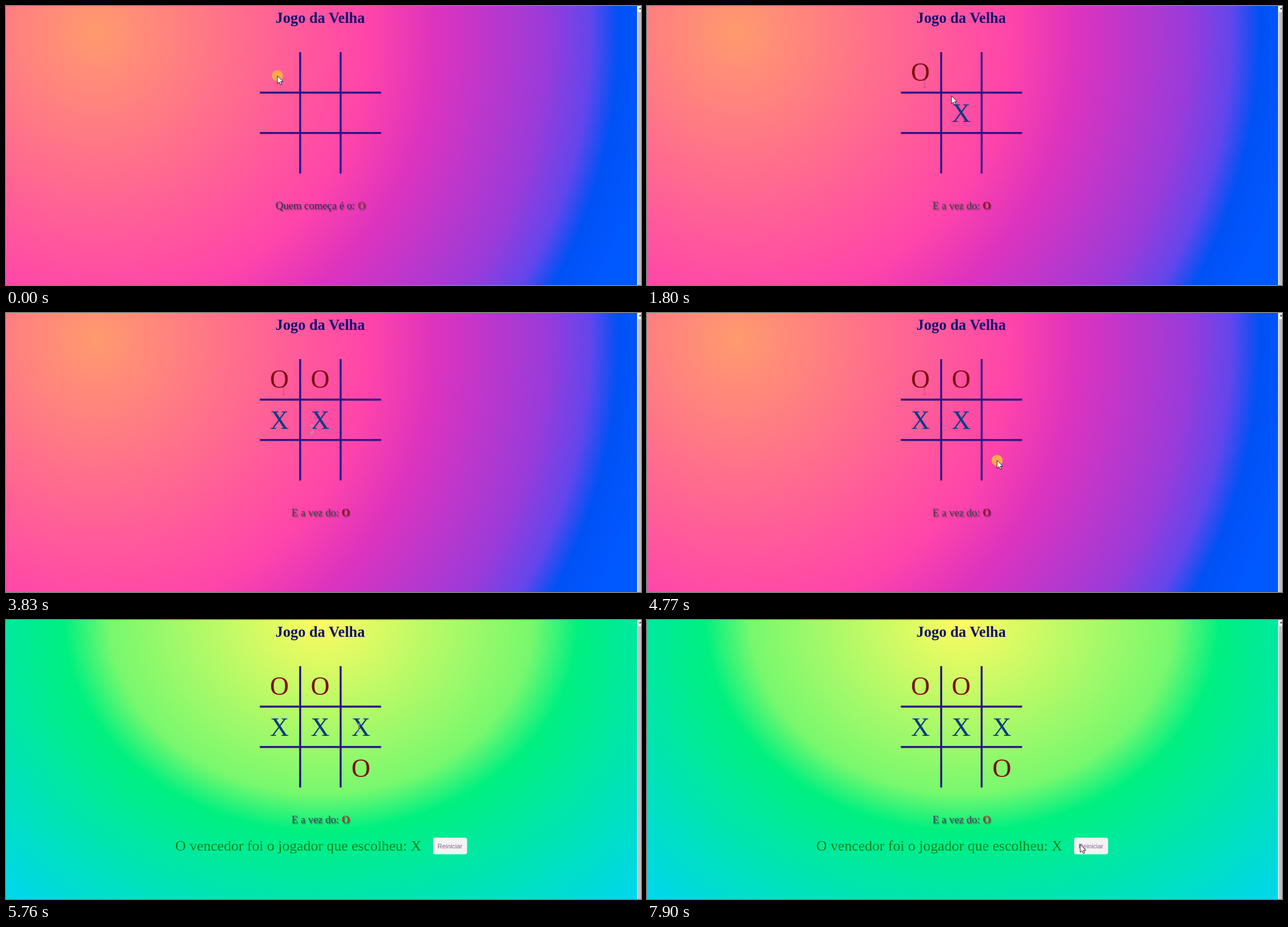
An HTML page that plays this animation: 1130 px wide and 496 px high, repeating every 8000 ms.

```html
<!DOCTYPE html>
<html lang="pt">
<head>
<meta charset="utf-8">
<title>Jogo da Velha</title>
<style>
  html, body { margin: 0; width: 100%; height: 100%; overflow: hidden; }
  #stage { position: relative; width: 1130px; height: 496px; overflow: hidden; background: #f6f2f6; }
  #back { position: absolute; left: 0; top: 0; width: 1123px; height: 496px; }
  .play { background: radial-gradient(circle 1000px at 160px 45px,
    #ff9a6e 0, #ff44aa 49%, #de33be 60%, #9a3bd9 80%, #6346ec 88%, #0051f4 93%, #0058ff 100%); }
  .won { background: radial-gradient(826px 677px at 561px 0,
    #fdfb60 0, #78f86e 45.5%, #00f080 55.4%, #00d6ee 100%); }
  svg { position: absolute; left: 0; top: 0; }
  text { font-family: "Liberation Serif", "Times New Roman", serif; white-space: pre; }
  #title { font-size: 26.75px; font-weight: bold; fill: #120f6e; }
  #grid { stroke: #2a1288; stroke-width: 3.5; }
  #marks text { font-size: 46.5px; text-anchor: middle; }
  .O { fill: #7c0f12; }
  .X { fill: #0c3b86; }
  #status { font-size: 18.9px; text-anchor: middle; text-shadow: 1.5px 1.5px 1.5px rgba(50, 50, 60, .6); }
  #status .O { fill: #8c1424; font-weight: bold; }
  #status .X { fill: #4a52dc; }
  #win { font-size: 26.15px; fill: #078516; }
  #label { font: 11.34px "Liberation Sans", Arial, sans-serif; fill: #8a5f98; }
</style>
</head>
<body>
<div id="stage">
  <div id="back"></div>
  <svg width="1130" height="496" viewBox="0 0 1130 496">
    <defs>
      <path id="beam" d="M-3 -6.5H-1L0 -5.5L1 -6.5H3M0 -5.5V5.5M-3 6.5H-1L0 5.5L1 6.5H3" fill="none"/>
    </defs>
    <rect x="1124.5" y="11" width="5.5" height="485" fill="#c1bfc1"/>
    <path d="M1126 6L1128.5 2.5L1131 6Z" fill="#555"/>
    <text id="title" x="479.5" y="29.5">Jogo da Velha</text>
    <path id="grid" d="M523.5 82V297.7M595.5 82V297.7M451.7 154H667.5M451.7 225.8H667.5"/>
    <g id="marks"></g>
    <text id="status" x="560" y="361"><tspan id="lead"></tspan><tspan id="turn"></tspan></text>
    <g id="result">
      <text id="win" x="301.3" y="410">O vencedor foi o jogador que escolheu: X</text>
      <rect x="760" y="387" width="60.5" height="29.5" rx="4" fill="#f2f3f2"/>
      <text id="label" x="768" y="406">Reiniciar</text>
    </g>
    <use id="trail" href="#beam" x="494" y="138.5" stroke="#7a2050" opacity=".4"/>
    <circle id="click" r="10" fill="#ffa94f"/>
    <g id="caret">
      <use href="#beam" x="2.5" y="1" stroke="#fff" stroke-width="2.4" opacity=".6"/>
      <use href="#beam" x="2.5" y="1" stroke="#47444f"/>
    </g>
    <path id="arrow" d="M0 0V14.2L3.3 11.2L5.5 16L7.8 15L5.7 10.3H10Z" fill="#fff" stroke="#1a1222"/>
  </svg>
</div>
<script>
const LOOP = 8000, STEP = 110;
const $ = id => document.getElementById(id);

// leave, arrive, x, y
const path = [
  [0, 0, 483, 124], [680, 900, 537, 177], [1010, 1130, 540, 180],
  [1800, 2150, 546, 114], [2820, 3030, 505, 200], [3830, 4050, 597, 213],
  [4160, 4500, 623, 262], [5100, 5320, 625, 191],
  [6320, 6560, 733, 377], [6890, 7460, 771, 399]
];
// press, release
const clicks = [[0, 130], [1340, 1580], [2360, 2470], [3380, 3500], [4770, 4870], [5550, 5760], [7710, 7900]];

const ease = u => u * (1.3 - 0.3 * u);

function pointer(t) {
  const i = path.findLastIndex(p => t >= p[0]);
  const [leave, arrive, x, y] = path[i];
  const [, , x0, y0] = path[Math.max(i - 1, 0)];
  const steps = Math.round((arrive - leave) / STEP) + 1;
  const u = ease(Math.min(1, (Math.floor((t - leave) / STEP) + 1) / steps));
  return [x0 + (x - x0) * u, y0 + (y - y0) * u];
}

// Every click but the last puts a sign in the cell under the pointer.
const marks = clicks.slice(0, -1).map(([press, time], i) => {
  const [px, py] = pointer(press);
  const x = 486.5 + 72.5 * Math.floor((px - 451) / 72);
  const y = 118 + 72.6 * Math.floor((py - 82) / 72);
  const sign = "OX"[i % 2];
  const el = document.createElementNS("http://www.w3.org/2000/svg", "text");
  el.setAttribute("x", x);
  el.setAttribute("y", y + 15.3);
  el.setAttribute("class", sign);
  el.textContent = sign;
  $("marks").append(el);
  return { el, x, y, time };
});

const show = (el, on) => el.style.display = on ? "" : "none";

function draw(t) {
  const played = marks.filter(m => t >= m.time);
  const won = played.length === marks.length;
  const begun = played.length > 0;
  marks.forEach(m => show(m.el, t >= m.time));

  const turn = "OX"[played.length % 2];
  $("lead").textContent = begun ? "E a vez do: " : "Quem começa é o: ";
  $("lead").style.fill = won ? "#364a5a" : begun ? "#45404c" : "#3c2a60";
  $("turn").textContent = turn;
  $("turn").setAttribute("class", turn);
  $("turn").style.fill = won ? "#a2442e" : begun ? "" : "#983350";

  $("back").className = won ? "won" : "play";
  show($("result"), won);
  show($("trail"), t >= path[1][0] && !won);

  const [x, y] = pointer(t);
  const overText = played.some(m => Math.abs(x - m.x) < 18 && Math.abs(y - m.y) < 26);
  show($("caret"), overText);
  show($("arrow"), !overText);
  show($("click"), clicks.some(([press, release]) => t >= press && t < release));
  for (const id of ["caret", "arrow", "click"])
    $(id).setAttribute("transform", `translate(${x} ${y})`);
}

const start = performance.now();
function tick() {
  draw((performance.now() - start) % LOOP);
  requestAnimationFrame(tick);
}
tick();
</script>
</body>
</html>
```
